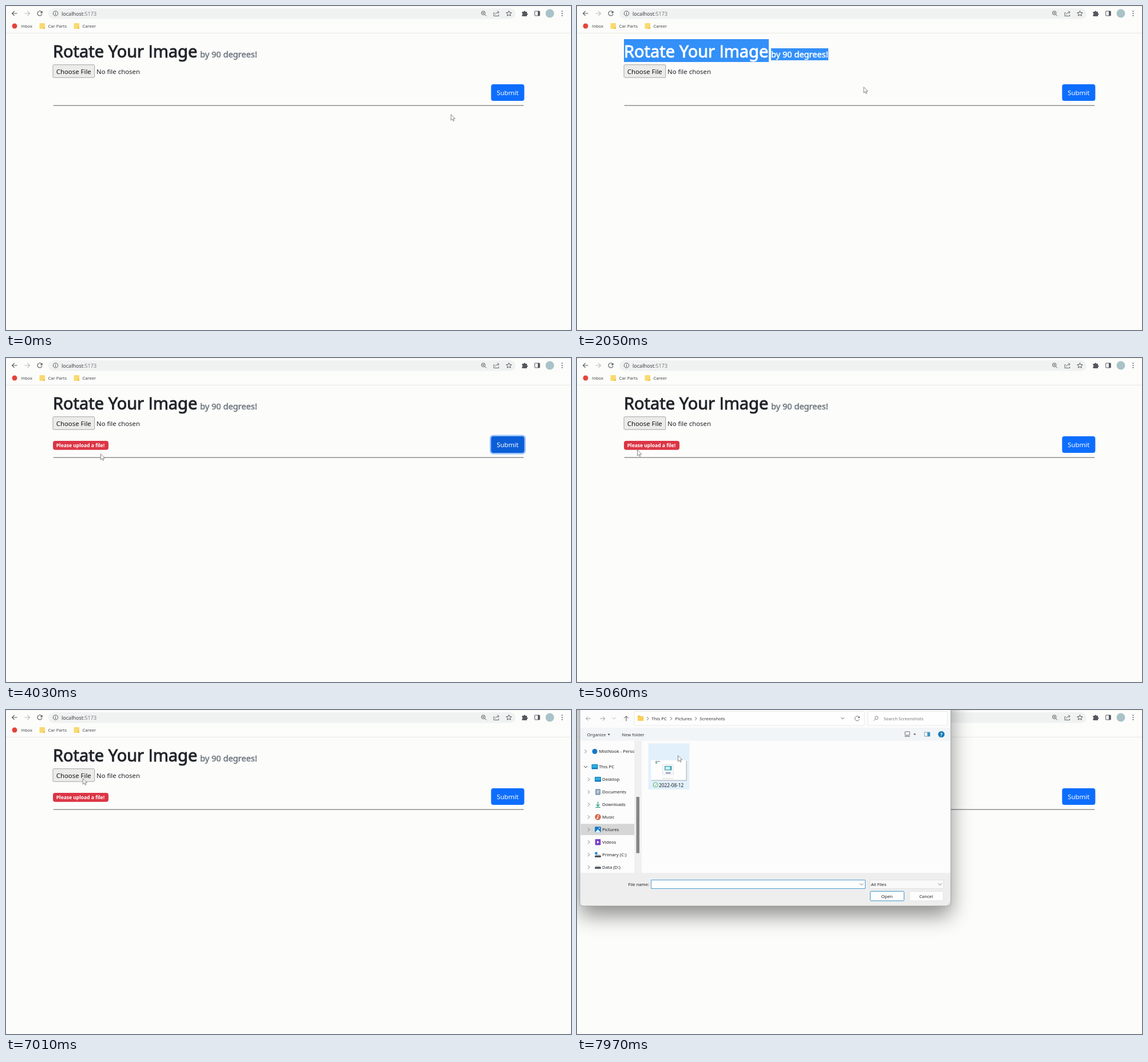
Recreate the animation shown at these times as an HTML page with a canvas. Size 987 px wide and 567 px high, loop 8000 ms.

```html
<!DOCTYPE html>
<html lang="en">
<head>
<meta charset="utf-8">
<title>Rotate Your Image</title>
<style>
html, body { margin: 0; width: 100%; height: 100%; overflow: hidden; background: #fcfcfb; }
canvas { display: block; }
</style>
</head>
<body>
<canvas id="stage" width="987" height="567"></canvas>
<script>
const c = document.getElementById('stage').getContext('2d');
const LOOP = 8000;
const INK = '#212529', ICON = '#55585c';
const SANS = '"Noto Sans", "Open Sans", sans-serif';
const PLAIN_I = '"Open Sans", "Noto Sans", sans-serif';

const CLICK_AWAY = 2250, SUBMIT = 3400, BLUR = 4900, OPEN = 7080, LOADED = 7330;

// time, x, y of the pointer tip
const PATH = [
  [0, 777, 189], [300, 777, 189], [700, 400, 135], [1000, 83, 78],
  [1150, 83, 78], [1330, 118, 77], [1700, 441, 82], [1900, 441, 82],
  [2200, 560, 200], [2600, 800, 268], [2910, 871, 176], [3150, 876, 153],
  [3480, 876, 153], [4030, 165, 167], [4350, 88, 158], [4700, 172, 159],
  [5050, 105, 160], [5500, 150, 175], [5900, 148, 150], [6260, 140, 122],
  [6700, 134, 119], [7450, 134, 119], [7970, 176, 79]
];

const clamp = v => Math.max(0, Math.min(1, v));
const smooth = v => v * v * (3 - 2 * v);

function pointer(t) {
  const i = PATH.findIndex(k => k[0] > t);
  if (i < 0) return PATH[PATH.length - 1].slice(1);
  const [t0, x0, y0] = PATH[i - 1], [t1, x1, y1] = PATH[i];
  const p = smooth((t - t0) / (t1 - t0));
  return [x0 + (x1 - x0) * p, y0 + (y1 - y0) * p];
}

function rect(x, y, w, h, color) {
  c.fillStyle = color;
  c.fillRect(x, y, w, h);
}

function box(x, y, w, h, r, fill, edge, lw = 1) {
  c.beginPath();
  c.roundRect(x, y, w, h, r);
  if (fill) { c.fillStyle = fill; c.fill(); }
  if (edge) { c.strokeStyle = edge; c.lineWidth = lw; c.stroke(); }
}

function disc(x, y, r, fill, edge, lw = 1) {
  box(x - r, y - r, 2 * r, 2 * r, r, fill, edge, lw);
}

function stroke(d, color = ICON, w = 1.1) {
  c.strokeStyle = color;
  c.lineWidth = w;
  c.stroke(new Path2D(d));
}

function fill(d, color = ICON) {
  c.fillStyle = color;
  c.fill(new Path2D(d));
}

// Draws a line of text and returns its end; without a colour it only measures.
// Heft thickens the strokes, as a share of the size.
function text(s, x, y, size, color = INK, weight = 400, heft = 0) {
  for (const run of s.split(/(I)/)) {
    c.font = `${weight} ${size}px ${run === 'I' ? PLAIN_I : SANS}`;
    if (color) {
      c.fillStyle = c.strokeStyle = color;
      c.fillText(run, x, y);
      if (heft) {
        c.lineWidth = size * heft;
        c.lineJoin = 'miter';
        c.strokeText(run, x, y);
      }
    }
    x += c.measureText(run).width;
  }
  return x;
}

function chevron(x, y, dir, color = '#666') {
  const d = dir === 'right' ? `M${x - 1.5} ${y - 3}l3 3-3 3` : `M${x - 3} ${y - 1.5}l3 3 3-3`;
  stroke(d, color, 0.9);
}

function star(x, y, r) {
  c.beginPath();
  for (let i = 0; i < 10; i++) {
    const a = i * Math.PI / 5 - Math.PI / 2, q = i % 2 ? r * 0.45 : r;
    c.lineTo(x + q * Math.cos(a), y + q * Math.sin(a));
  }
  c.closePath();
  c.strokeStyle = ICON;
  c.lineWidth = 1;
  c.stroke();
}

function browser() {
  rect(0, 0, 987, 567, '#fcfcfb');
  rect(0, 0, 987, 1, '#eff1e6');
  rect(0, 47, 987, 1, '#e9ebdf');
  box(74, 4, 816, 18.5, 9.2, '#f0f2f2');

  stroke('M19.5 13H10.7M14.7 8.9L10.6 13l4.1 4.1');
  stroke('M32.5 13h8.8M37.3 8.9L41.4 13l-4.1 4.1', '#b9bbbd');
  stroke('M62.4 10.5A4.1 4.1 0 1 0 63 14');
  fill('M63.6 8.4v4.2h-4.2z');
  disc(86.5, 13, 4.2, null, ICON, 1);
  stroke('M86.5 12.6v2.8M86.5 10.5v1.1');
  text(':5173', text('localhost', 97, 16.5, 9, '#3a3d40'), 16.5, 9, '#75797d');

  disc(833.8, 12.2, 3.3, null, ICON);
  stroke('M836.2 14.6l3 3M832.3 12.2h3M833.8 10.7v3', ICON, 1);
  stroke('M853.6 11.5h-1.4v6h8.5V15M855 15.2c.3-3 2-4.2 5.6-4.2M858.5 8.6l2.9 2.4-2.9 2.4', ICON, 0.9);
  star(878.5, 13.3, 5);
  fill('M901.5 10h2.8a1.5 1.5 0 1 1 3 0h2.7v2.7a1.5 1.5 0 1 1 0 3V18h-8.5v-2.6a1.5 1.5 0 0 0 0-2.8z');
  box(923.7, 9, 8.6, 8, 0.5, null, ICON);
  rect(929, 9, 3.3, 8, ICON);
  disc(950, 13, 7.5, '#a8c3c8');
  for (const y of [9.3, 13, 16.7]) disc(971.5, y, 1, ICON);

  disc(15, 35, 4.5, '#e5443a');
  text('Inbox', 26, 37.8, 7.7, '#46494c');
  for (const [x, name] of [[58.5, 'Car Parts'], [118.5, 'Career']]) {
    box(x, 30, 9.5, 10, 1, '#fad96f');
    fill(`M${x + 9.5} 36v4h-4z`, '#e9bf45');
    text(name, x + 15, 37.8, 7.6, '#46494c');
  }
}

const TITLE = [
  { s: 'Rotate Your Image', x: 82, size: 29, color: INK, top: 58, h: 40 },
  { s: 'by 90 degrees!', x: 339, size: 14.6, color: '#6c757d', top: 74, h: 21 }
];
const HEFT = 0.032;

// End of the last glyph whose middle lies left of x.
function snap(part, x) {
  let end = part.x;
  for (let i = 1; i <= part.s.length; i++) {
    const next = text(part.s.slice(0, i), part.x, 0, part.size, null);
    if ((end + next) / 2 > x) break;
    end = next;
  }
  return Math.ceil(end);
}

function title(t, x) {
  const selecting = t >= 1150 && t < CLICK_AWAY;
  const to = t < 1900 ? x : 441;
  for (const part of TITLE) {
    const { s, size, color, top, h } = part;
    text(s, part.x, 90, size, color, 400, HEFT);
    if (!selecting) continue;
    const w = snap(part, to) - part.x;
    if (w <= 0) continue;
    c.save();
    c.beginPath();
    c.rect(part.x, top, w, h);
    c.clip();
    rect(part.x, top, w, h, '#3390f8');
    text(s, part.x, 90, size, '#fff', 400, HEFT);
    c.restore();
  }
}

const overSubmit = (x, y) => x > 847 && x < 906 && y > 137 && y < 166;

function page(t, x, y) {
  title(t, x);
  box(82, 102.8, 72.7, 22.4, 1.5, '#ececea', '#9c9d96', 0.9);
  text('Choose File', 87.7, 118.6, 11.4, '#151515');
  text('No file chosen', 158, 118.6, 11.4);
  if (t >= SUBMIT + 60) {
    box(82, 145, 97, 15.8, 4, '#dc3545');
    text('Please upload a file!', 87.7, 156.1, 8.5, '#fff', 700);
  }
  const focus = t >= SUBMIT && t < BLUR;
  if (focus) box(845, 134.5, 63, 34, 6, '#9cc4fb');
  box(847.4, 137.1, 58, 28.8, 4, focus || overSubmit(x, y) ? '#0b5ed7' : '#0d6efd');
  text('Submit', 857.3, 156.1, 11.4, '#fff');
  rect(82.7, 173.4, 821.6, 1.6, '#98989c');
}

const ICONS = {
  screen(x, y) {
    box(x - 5.5, y - 4.5, 11, 8.5, 1, '#1277b8');
    box(x - 4.5, y - 3.5, 9, 5, 0.5, '#29b0de');
  },
  doc(x, y) {
    box(x - 4.5, y - 5.3, 9, 10.6, 1, '#8b9fb5');
    stroke(`M${x - 2} ${y - 2}h4.5M${x - 2} ${y}h4.5M${x - 2} ${y + 2}h3`, '#fff', 0.9);
  },
  down(x, y) {
    stroke(`M${x} ${y - 5}v7.5M${x - 3} ${y}l3 3 3-3M${x - 4} ${y + 5}h8`, '#23967f', 1.2);
  },
  music(x, y) {
    disc(x, y, 5.3, '#d7694f');
    stroke(`M${x} ${y + 2}v-5l2.3 1.2`, '#fff', 1);
    disc(x - 1, y + 2, 1.2, '#fff');
  },
  picture(x, y) {
    box(x - 5.3, y - 5, 10.6, 10, 1, '#1779c4');
    fill(`M${x - 5} ${y + 5}l5-5.5 5 5.5z`, '#e4f3fb');
    disc(x + 2.4, y - 2.3, 1, '#fff');
  },
  video(x, y) {
    box(x - 4.8, y - 5.3, 9.6, 10.6, 1, '#7b3fc4');
    fill(`M${x - 1.5} ${y - 2.5}l4 2.5-4 2.5z`, '#fff');
  },
  blank(x, y) {
    box(x - 4, y - 5, 8, 10, 0.5, '#fff', '#999', 0.8);
  },
  cloud: (x, y) => disc(x, y, 4.5, '#1478c9'),
  system(x, y) {
    ICONS.disk(x, y + 2);
    rect(x - 5, y - 4.5, 4, 4, '#1683d0');
  },
  disk(x, y) {
    fill(`M${x - 4} ${y - 2.2}h8l1.3 2.2h-10.6z`, '#b9bdc2');
    box(x - 5.3, y - 0.2, 10.6, 2.8, 0.6, '#3f474f');
  }
};

// name, final icon, icon while loading
const ROWS = [
  ['Desktop', 'screen', 'screen'], ['Documents', 'doc', 'doc'], ['Downloads', 'down'],
  ['Music', 'music'], ['Pictures', 'picture', 'picture'], ['Videos', 'video', 'video'],
  ['Primary (C:)', 'system', 'blank'], ['Data (D:)', 'disk', 'blank']
];

function sidebar(ready) {
  const size = 7.8, ink = '#222';
  rect(100, 54, 13, 231, '#f0f0f0');
  box(103.5, 152, 5.5, 98.5, 0.5, '#858585');
  chevron(15, 72.5, 'right');
  c.save();
  c.beginPath();
  c.rect(5, 54, 95, 40);
  c.clip();
  text('MistNook - Perso', 38.5, 75.3, size, ink);
  c.restore();
  chevron(15, 99.5, 'down', '#333');
  text('This PC', 38.5, 102.3, size, ink);
  if (ready) {
    ICONS.cloud(31, 72.5);
    ICONS.screen(31, 99.5);
  }
  ROWS.forEach(([name, icon, early], i) => {
    const y = 121.5 + i * 21.95;
    if (name === 'Pictures') rect(6.5, y - 10, 93.5, 19.6, '#d6d6d6');
    chevron(20.5, y, 'right');
    const kind = ready ? icon : early;
    if (kind) ICONS[kind](36.5, y);
    text(name, 44, y + 2.8, size, ink);
  });
}

function fileTile(ready) {
  rect(124.5, 58.5, 72, 80.5, '#e1f0fb');
  rect(130, 89, 62, 35, '#b9c1c7');
  rect(129, 88, 61.5, 34.5, '#fdfdfd');
  rect(137, 89.5, 8, 1.2, '#7c8fa0');
  rect(137, 91.5, 3, 2, '#49a47f');
  box(149.5, 95.5, 19, 17.5, 0.5, '#f7f8f8', '#d5dadd', 0.7);
  rect(153, 98, 12.5, 7.5, '#3aa6b8');
  rect(154.5, 99.3, 8, 5, '#d9eef0');
  rect(155, 109.5, 8.5, 1.6, '#6272b5');
  rect(149, 119.5, 20, 0.8, '#d0d0d0');
  if (ready) {
    disc(137.2, 131, 4, '#fff', '#2f9d55', 0.9);
    stroke('M135.2 131.1l1.5 1.5 2.6-3', '#2f9d55', 0.9);
  }
  text('2022-08-12', 143, 134.5, 8.3, '#222');
}

function dialogTop() {
  const ink = '#333', y = 17.6, size = 7.75;
  stroke('M24 15h-8M19.3 11.3L15.6 15l3.7 3.7', '#8d8d8d', 0.9);
  stroke('M40.5 15h8M45.2 11.3L48.9 15l-3.7 3.7', '#8d8d8d', 0.9);
  chevron(64.5, 14.5, 'down', '#aaa');
  stroke('M86 19.5v-8.6M82.2 14.5L86 10.7l3.8 3.8', '#444', 1);
  box(100, 2.5, 402, 24.5, 1, '#fefefe', '#e7e7e4', 0.9);
  box(508, 2.5, 139, 24.5, 1, '#fefefe', '#e7e7e4', 0.9);
  box(106, 10, 4.5, 3, 0.6, '#e5a823');
  box(106, 11, 10.5, 8, 0.8, '#fbcf57');
  for (const x of [123.5, 164.5, 207.5]) chevron(x, 15, 'right');
  text('This PC', 130.5, y, size, ink);
  text('Pictures', 171.5, y, size, ink);
  text('Screenshots', 214.3, y, size, ink);
  chevron(464, 14.5, 'down');
  stroke('M492.6 12.3A4 4 0 1 0 493.3 16', '#666', 0.9);
  fill('M493.8 10.5v3.6h-3.6z', '#666');
  disc(523.3, 13.8, 2.7, null, '#777', 0.9);
  stroke('M521.4 15.8l-3 3', '#777', 0.9);
  text('Search Screenshots', 535.8, y, 7.6, '#777');

  rect(5.5, 31, 647, 23, '#f2f5f7');
  text('Organize', 17.5, 45.8, size, ink);
  fill('M53.5 41.8h4.4l-2.2 2.6z', '#444');
  text('New folder', 78.3, 45.8, 7.65, ink);
  box(573, 38, 8, 6, 0.5, '#fff', '#555', 0.9);
  rect(572.5, 45.6, 9, 1, '#555');
  fill('M587.8 41.5h4.4l-2.2 2.6z', '#444');
  box(607, 39, 9.5, 7, 0.5, '#fff', '#5a7e95', 0.8);
  rect(612, 39, 4.5, 7, '#3a97c9');
  disc(636.5, 42.5, 5.6, '#1379b5');
  text('?', 634.6, 45.7, 8.5, '#fff', 700);
}

function dialogFoot(ready) {
  rect(5.5, 285, 647, 52, '#eeeeee');
  box(5.5, 325, 647, 17.8, [0, 0, 5, 5], '#eeeeee');
  if (!ready) {
    rect(89, 299, 37, 12, '#fbfbfb');
    rect(129, 298, 374, 15, '#fdfdfd');
    rect(511, 298, 129, 14.5, '#fbfbfb');
    rect(511, 317, 60.5, 18.5, '#fdfdfd');
    rect(579.5, 317, 60.5, 18.5, '#fdfdfd');
    rect(640, 330.5, 12, 12, '#fbfbfb');
    return;
  }
  text('File name:', 89.3, 307.8, 7.65, '#222');
  box(129.5, 297.5, 374, 15, 0.5, '#fefefe', '#4f9ccb', 1);
  chevron(497, 305, 'down');
  box(511.8, 297.5, 128.5, 15, 1, '#f9f9f9', '#dedede', 0.8);
  text('All Files', 513.5, 307.8, 7.7, '#222');
  chevron(634, 305, 'down');
  box(512.3, 317.3, 59, 16.6, 1.5, '#fdfdfd', '#3a93c4', 1);
  text('Open', 531.5, 328.6, 7.7, '#222');
  box(581, 317.3, 59, 16.6, 1.5, '#fdfdfd', '#dcdcdc', 0.8);
  text('Cancel', 598, 328.6, 7.7, '#222');
  for (const [x, y] of [[650, 337], [650, 340], [647, 340]]) rect(x, y, 1.3, 1.3, '#aaa');
}

function dialog(t) {
  const p = clamp((t - OPEN) / 300);
  const scale = 1 - 0.08 * (1 - p) ** 3;
  const ready = t >= LOADED;
  c.save();
  c.globalAlpha = clamp(p * 4);
  c.translate(329, 122);
  c.scale(scale, scale);
  c.translate(-329, -122);
  c.save();
  c.shadowColor = 'rgba(0,0,0,.45)';
  c.shadowBlur = 36;
  c.shadowOffsetY = 16;
  box(5, -99, 648, 442, 5, '#fcfcfc');
  c.restore();
  if (ready) dialogTop();
  sidebar(ready);
  fileTile(ready);
  dialogFoot(ready);
  box(5, -99, 648, 442, 5, null, '#9a9a9a', 0.9);
  c.restore();
}

function cursor(t, x, y) {
  const inTitle = y > 58 && y < 98 && x > 82 && x < 442;
  c.save();
  c.translate(x, y);
  if (t < OPEN && overSubmit(x, y)) {
    const hand = 'M-1 0q1-1 2 0v4.5l4 1q1 .4 1 1.5l-.8 5h-5.4l-3.6-4.5q0-1.4 1.4-1l1.4 1z';
    fill(hand, '#fff');
    stroke(hand, '#222', 0.8);
  } else if (t < OPEN && inTitle) {
    stroke('M-2.5-6H2.5M0-6V6M-2.5 6H2.5', '#333', 1);
  } else {
    const arrow = 'M.4 .8v10.2l2.4-2.2 1.6 3.6 1.5-.7-1.6-3.5h3.4z';
    fill(arrow, '#fff');
    stroke(arrow, '#555', 0.7);
  }
  c.restore();
}

function draw(t) {
  const [x, y] = pointer(t);
  browser();
  page(t, x, y);
  if (t >= OPEN) dialog(t);
  cursor(t, x, y);
}

let start;
function frame(now) {
  start ??= now;
  draw((now - start) % LOOP);
  requestAnimationFrame(frame);
}
requestAnimationFrame(frame);
</script>
</body>
</html>
```
